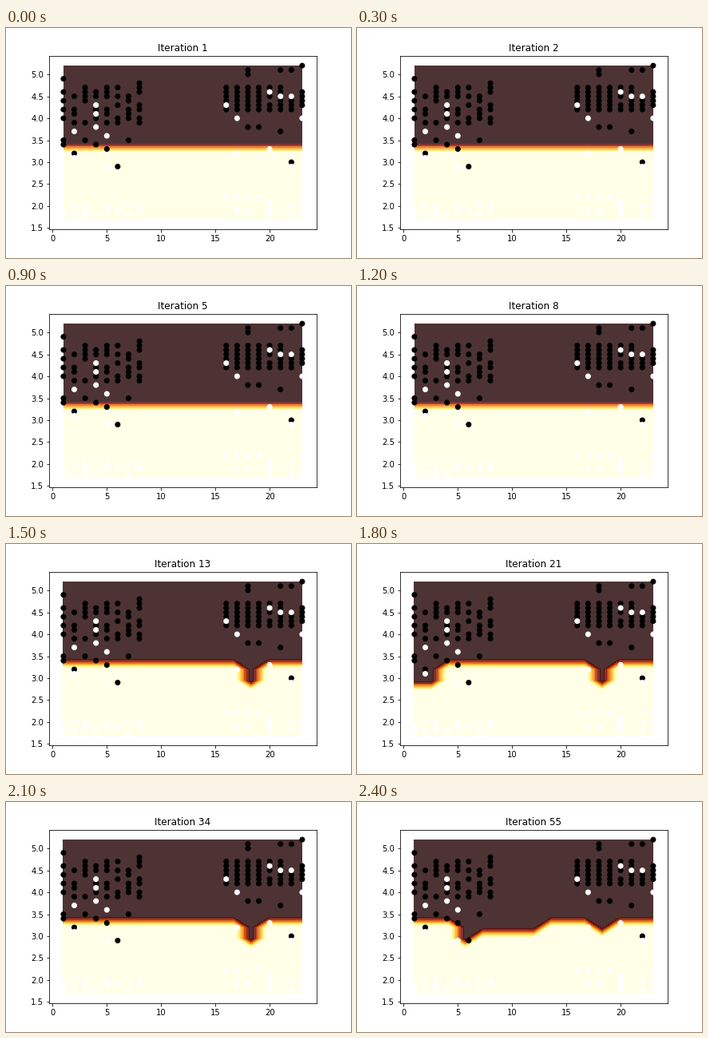
Write a matplotlib script that moves like this. It is 432 px wide and 288 px high and loops after 2.7 s.

```python
import numpy as np
import matplotlib.pyplot as plt
from matplotlib.animation import FuncAnimation

plt.rcParams["font.family"] = "DejaVu Sans"

FRAMES = 9
GRID_X = np.linspace(1, 23, 15)
GRID_Y = np.linspace(1.7, 5.2, 15)
LEFT, RIGHT = range(1, 9), range(16, 24)

# Samples that stand apart from the clouds
BLACK_OUTLIERS = [(1, 4.9), (1, 3.5), (1, 3.4), (2, 3.2), (3, 3.5), (4, 3.4),
                  (5, 3.3), (6, 2.9), (7, 3.5), (8, 4.8), (18, 5.1), (18, 5.0),
                  (18, 3.8), (19, 3.8), (21, 5.1), (21, 3.7), (22, 5.1),
                  (22, 3.0), (23, 5.2)]
WHITE_OUTLIERS = [(2, 3.7), (2, 3.1), (4, 4.3), (4, 4.1), (4, 3.8), (5, 3.6),
                  (5, 2.9), (16, 4.3), (17, 4.0), (17, 3.2), (20, 4.6),
                  (20, 3.3), (21, 4.5), (22, 4.5), (22, 2.9), (23, 4.0)]

rng = np.random.default_rng(4)


def cloud(columns, low, high, density):
    """Random subset of the 0.1-spaced samples between low and high."""
    heights = np.arange(round(low * 10), round(high * 10) + 1) / 10
    return [(x, y) for x in columns for y in heights if rng.random() < density]


black = cloud(LEFT, 3.9, 4.7, 0.6) + cloud(RIGHT, 4.2, 4.7, 0.8) + BLACK_OUTLIERS
white = (cloud(LEFT, 1.8, 2.0, 0.7) + cloud(RIGHT, 1.8, 2.2, 0.6)
         + WHITE_OUTLIERS)
SAMPLES = np.array(black + white)
COLORS = ["black"] * len(black) + ["white"] * len(white)


def iteration_number(index):
    """Fibonacci sequence 1, 2, 3, 5, 8, ..."""
    a, b = 1, 2
    for _ in range(index):
        a, b = b, a + b
    return a


def prediction(iteration):
    """Classifier output on the grid: -1 above the boundary, +1 below."""
    lowest = np.full(15, 7)  # lowest dark row of each column
    if iteration >= 13:
        lowest[11] = 5
    if iteration == 21:
        lowest[:2] = 5
    if iteration == 55:
        lowest[3] = 5
        lowest[4:8] = lowest[11] = 6
    return np.where(np.arange(15)[:, None] >= lowest, -1.0, 1.0)


def draw(index):
    iteration = iteration_number(index)
    ax.clear()
    ax.contourf(GRID_X, GRID_Y, prediction(iteration), cmap="afmhot", alpha=0.8)
    ax.scatter(*SAMPLES.T, c=COLORS)
    ax.set(xlim=(-0.317, 24.317), ylim=(1.472, 5.428),
           title=f"Iteration {iteration}")


fig, ax = plt.subplots(figsize=(6, 4), dpi=72)
fig.subplots_adjust(left=0.125, right=0.9, bottom=0.125, top=0.88)
animation = FuncAnimation(fig, draw, frames=FRAMES, interval=300,
                          init_func=lambda: None, repeat=True)
plt.show()
```
